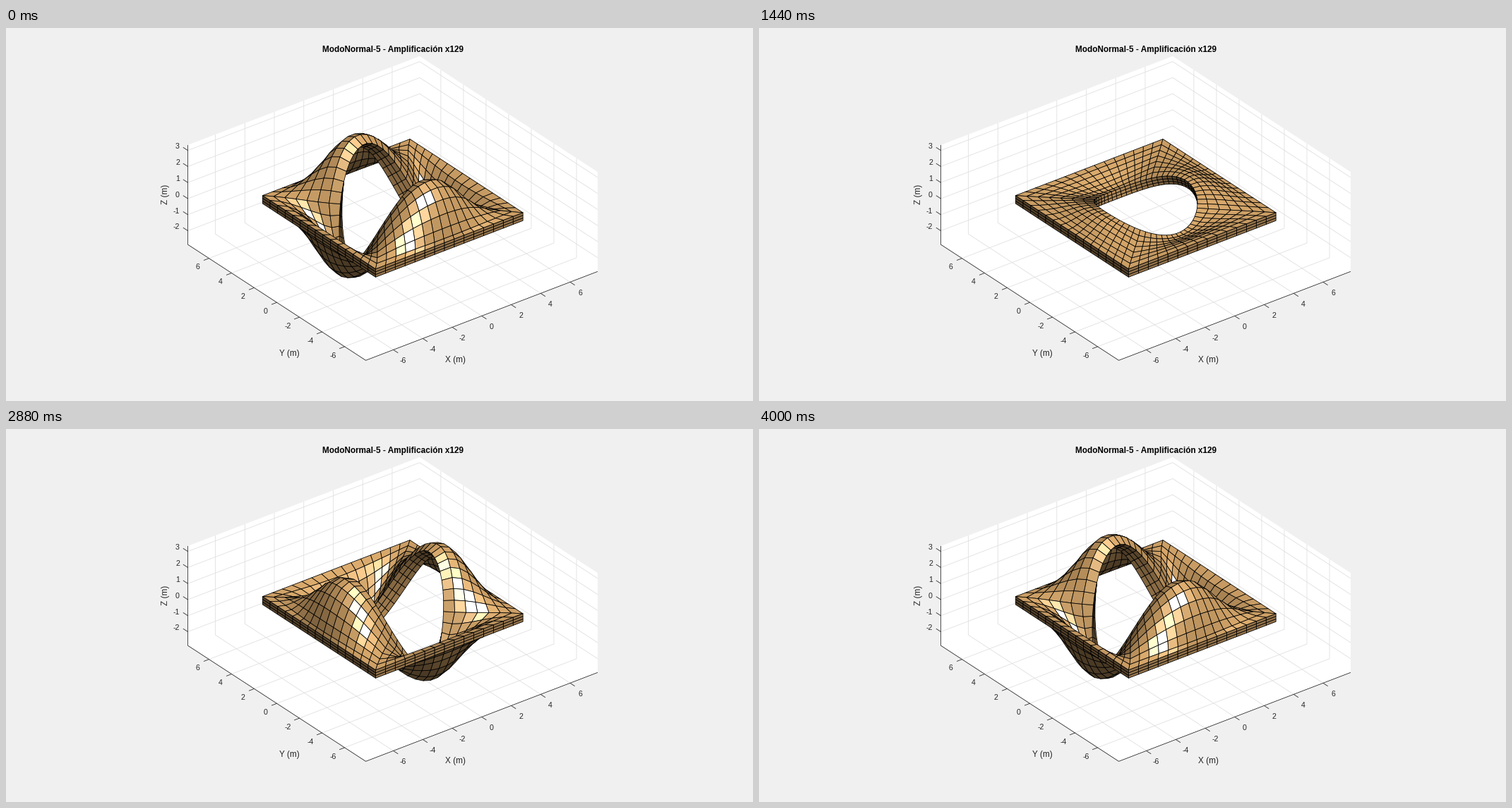
Animation, 1058 px wide and 529 px high, one loop 4.08 s. Source, as a matplotlib script:

```python
import numpy as np
import matplotlib.pyplot as plt
from matplotlib.animation import FuncAnimation
from matplotlib.collections import LineCollection, PolyCollection

W, H, DPI = 1058, 529, 100
FRAMES, INTERVAL = 51, 80

# Plate: square with a round hole, clamped on its outer edge
HALF, HOLE, THICK = 5.0, 2.8, 0.5
SIDE, ROWS, LAYERS = 15, 7, 3

# Mode: peak height, crest position between edge (0) and hole (1), fibre tilt
PEAK, CREST, TILT = 2.85, 0.86, 0.75

# View: orthographic, 26.3 px per metre
SCALE, CX, CY = 26.3, 547.75, 261.1
AZ, EL = np.radians([-37.5, 30])
LIM, ZMIN, ZMAX = 7.87, -2.86, 3.34

COPPER = np.array([0.97, 0.757, 0.483])
INK = "#262626"


def direction(az, el):
    return np.array([np.cos(el) * np.sin(az), -np.cos(el) * np.cos(az), np.sin(el)])


CAMERA = direction(AZ, EL)
LIGHT = direction(AZ + np.pi / 6, EL + np.pi / 6)
RIGHT = np.array([np.cos(AZ), np.sin(AZ), 0])
UP = np.cross(CAMERA, RIGHT)


def project(p):
    p = np.asarray(p, float)
    return np.stack([CX + SCALE * (p @ RIGHT), CY - SCALE * (p @ UP)], axis=-1)


# ---- mesh and vibration mode ----

def build_plate():
    """Nodes at rest and their displacement at full amplitude."""
    k = np.arange(4 * SIDE + 1)
    ang = np.radians(-45 + k * 90 / SIDE)
    turn = k // SIDE * np.pi / 2
    frac = k % SIDE * 2 / SIDE - 1
    c, s = np.cos(turn), np.sin(turn)
    hole = HOLE * np.stack([np.cos(ang), np.sin(ang)])
    hole_d = HOLE * np.stack([-np.sin(ang), np.cos(ang)])
    edge = HALF * np.stack([c - s * frac, s + c * frac])
    edge_d = HALF * 4 / np.pi * np.stack([-s, c])

    t = np.linspace(0, 1, ROWS + 1)[:, None]
    x, y = [(1 - t) * h + t * e for h, e in zip(hole, edge)]
    xt, yt = edge - hole
    xa, ya = [(1 - t) * h + t * e for h, e in zip(hole_d, edge_d)]

    # Smooth rise from the clamped edge to a crest just outside the hole
    q = (1 - t) / CREST
    rise, rise_t = q ** 2 * (3 - 2 * q), -6 * q * (1 - q) / CREST
    w = -PEAK * rise * np.cos(2 * ang)
    wt = -PEAK * rise_t * np.cos(2 * ang)
    wa = 2 * PEAK * rise * np.sin(2 * ang)
    det = xt * ya - yt * xa
    wx, wy = (wt * ya - wa * yt) / det, (wa * xt - wt * xa) / det

    nodes, shape = [], []
    for z in np.linspace(0, THICK, LAYERS + 1):
        lever = TILT * (THICK / 2 - z)
        nodes.append(np.stack([x, y, np.full_like(x, z)], axis=-1))
        shape.append(np.stack([lever * wx, lever * wy, w], axis=-1))
    return np.array(nodes), np.array(shape)


def quads(g):
    q = np.stack([g[:-1, :-1], g[1:, :-1], g[1:, 1:], g[:-1, 1:]], axis=2)
    return q.reshape(-1, 4, 3)


def skin(p):
    return np.concatenate([quads(p[-1]), quads(p[0].swapaxes(0, 1)),
                           quads(p[:, -1].swapaxes(0, 1)), quads(p[:, 0])])


def shade(normal):
    lit = normal @ LIGHT
    mirror = 2 * lit[:, None] * normal - LIGHT
    gloss = np.where(lit > 0, np.clip(mirror @ CAMERA, 0, 1) ** 10, 0)
    tone = 0.3 + 0.6 * np.clip(lit, 0, 1)
    return np.clip(tone[:, None] * COPPER + 0.9 * gloss[:, None], 0, 1)


NODES, SHAPE = build_plate()

# ---- stage ----

fig = plt.figure(figsize=(W / DPI, H / DPI), dpi=DPI, facecolor="#f0f0f0")
ax = fig.add_axes([0, 0, 1, 1])
ax.set_xlim(0, W)
ax.set_ylim(H, 0)
ax.axis("off")


def px(n):
    return n * 72 / DPI


def label(x, y, text, size=10.67, color=INK, **kw):
    kw = {"ha": "center", "va": "baseline", **kw}
    ax.text(x, y, text, fontsize=px(size), family="Liberation Sans", color=color, **kw)


def lines(segments, color, width, z):
    ax.add_collection(LineCollection(segments, colors=color, linewidths=px(width), zorder=z))


def draw_box():
    a, lo, hi = LIM, ZMIN, ZMAX
    outline = [(-a, a, lo), (-a, a, hi), (a, a, hi), (a, -a, hi), (a, -a, lo), (-a, -a, lo)]
    ax.add_collection(PolyCollection([project(outline)], facecolors="white",
                                     edgecolors="none", zorder=0))
    grid, axes = [], []
    along_x, along_y = project([(1, 0, 0), (0, 1, 0)]) - project((0, 0, 0))
    tick_x = -8 * along_y / np.hypot(*along_y)
    tick_y = -8 * along_x / np.hypot(*along_x)

    for v in range(-6, 7, 2):
        grid.append(project([(v, -a, lo), (v, a, lo), (v, a, hi)]))
        grid.append(project([(-a, v, lo), (a, v, lo), (a, v, hi)]))
        p, q = project((v, -a, lo)), project((-a, v, lo))
        axes += [[p, p + tick_x], [q, q + tick_y]]
        label(p[0] + 14, p[1] + 18.6, str(v))
        label(q[0] - 16, q[1] + 15.8, str(v))
    for v in range(-2, 4):
        grid.append(project([(-a, a, v), (a, a, v), (a, -a, v)]))
        p = project((-a, a, v))
        axes.append([p, p - tick_x])
        label(246, p[1] - 2.2, str(v), ha="right")

    axes.append(project([(-a, a, hi), (-a, a, lo), (-a, -a, lo), (a, -a, lo)]))
    lines(grid, "#dfdfdf", 0.8, 1)
    lines(axes, INK, 0.8, 2)


draw_box()
label(547.5, 34.4, "ModoNormal-5 - Amplificación x129", 11.73, "black", weight="bold")
label(636.5, 474, "X (m)", 11.73)
label(401.5, 465, "Y (m)", 11.73)
label(225.5, 236, "Z (m)", 11.73, va="center", rotation=90)

plate = PolyCollection([], edgecolors="black", linewidths=px(0.8), joinstyle="round", zorder=5)
ax.add_collection(plate)


def update(i):
    faces = skin(NODES + np.cos(4 * np.pi * i / (FRAMES - 1)) * SHAPE)
    normal = np.cross(faces[:, 2] - faces[:, 0], faces[:, 3] - faces[:, 1])
    normal /= np.linalg.norm(normal, axis=1, keepdims=True)
    front = normal @ CAMERA > 0
    faces, normal = faces[front], normal[front]
    order = np.argsort(faces.mean(axis=1) @ CAMERA)
    plate.set_verts(project(faces[order]))
    plate.set_facecolor(shade(normal[order]))
    return [plate]


anim = FuncAnimation(fig, update, frames=FRAMES, interval=INTERVAL, repeat=True,
                     repeat_delay=0, blit=False)
plt.show()
```
